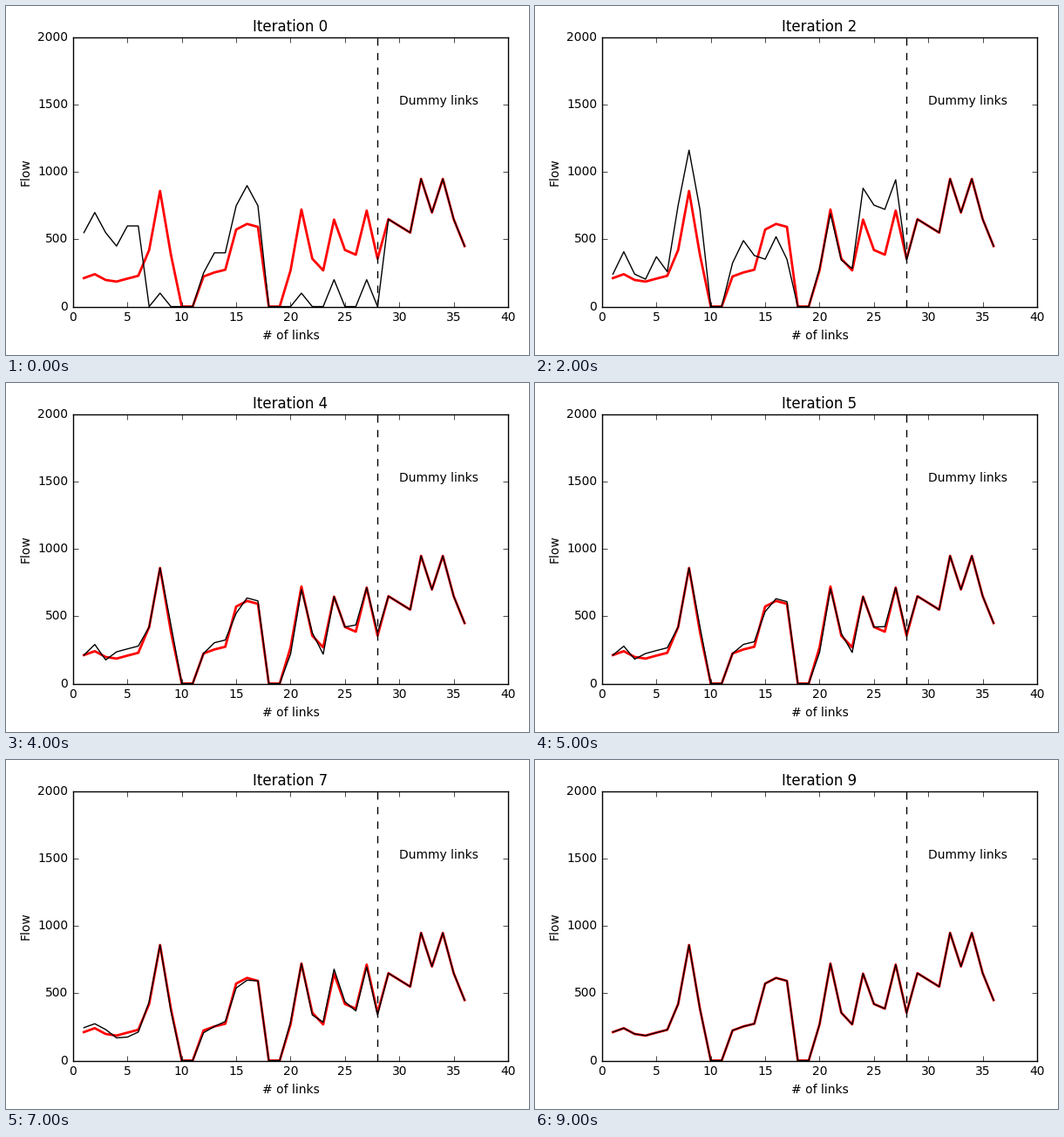
These frames come from a looping animation (600 px wide and 400 px high, 10000 ms). A matplotlib script:

```python
import numpy as np
import matplotlib.pyplot as plt
from matplotlib.animation import FuncAnimation

W, H = 600, 400
LEFT, RIGHT, TOP, BOTTOM = 76.9, 576.0, 36.35, 344.51

plt.rcParams.update({
    "font.family": "DejaVu Sans",
    "font.size": 10,
    "text.kerning_factor": 6,
    "axes.linewidth": 1.0,
    "axes.axisbelow": False,
    "ytick.alignment": "center",
    "lines.scale_dashes": False,
})

links = np.arange(1, 37)


def shift(flow, amount, up=(), down=()):
    """Move the same amount of traffic onto some links and off others."""
    return flow + amount * np.isin(links, up) - amount * np.isin(links, down)


def load(routes):
    """Sum up traffic given as {links of a route: flow}."""
    flow = np.zeros(len(links))
    for route, amount in routes.items():
        flow = shift(flow, amount, up=route)
    return flow


def blend(a, b, step):
    return (1 - step) * a + step * b


# Dummy links carry the fixed demand in every iteration.
demand = load({(29, 35): 650, (30,): 600, (31,): 550, (32, 34): 950,
               (33,): 700, (36,): 450})

# All-or-nothing loads: side streets, then main road, then side streets again.
side = demand + load({
    (1, 3): 550, (2,): 700, (4,): 450, (5, 6): 600, (12,): 250,
    (13, 14): 400, (15, 17): 750, (16,): 900})
start = shift(shift(side, 100, up=(8, 21)), 200, up=(24, 27))
main = demand + load({
    (7, 25): 1200, (8,): 1850, (9, 26): 1150, (12, 13, 14): 250,
    (20, 23): 450, (21,): 1100, (22, 28): 550, (24,): 1400, (27,): 1500})
detour = shift(side, 100, up=range(1, 7))
detour = shift(detour, 200, up=range(12, 18))
detour = shift(detour, 300, up=(2, 5, 13, 16))

# Equilibrium that the iterations settle on.
settled = demand + load({
    (1,): 212, (2,): 241, (3,): 198, (4,): 186, (5,): 208, (6,): 229,
    (7, 25): 421, (8,): 860, (9, 26): 386, (12,): 224, (13,): 254, (14,): 274,
    (15,): 573, (16,): 615, (17,): 593, (20, 23): 269, (21,): 722,
    (22, 28): 356, (24,): 647, (27,): 714})

# Ever smaller swings of traffic around the equilibrium.
swing = shift(settled, 80, up=(4, 6, 7, 9, 13, 14, 21, 22, 25, 26, 28),
              down=(20, 23))
swing = shift(swing, 45, up=(2, 5, 15, 16), down=(1, 3, 8, 17))
near = shift(settled, 50, up=(2, 4, 5, 6, 9, 13, 14, 26), down=(15, 20, 23))
near = shift(near, 22, up=(16, 17, 22, 28), down=(3, 21))
back = shift(settled, 33, up=(1, 2, 3, 24), down=(5, 15))
back = shift(back, 17, up=(7, 14, 20, 23, 25),
             down=(4, 6, 9, 12, 16, 22, 26, 27, 28))

iterations = [
    start, main, blend(main, detour, 0.371), swing,
    near, blend(near, settled, 0.25), blend(near, settled, 0.38),
    back, blend(back, settled, 0.8), settled,
]

fig = plt.figure(figsize=(W / 100, H / 100), dpi=100, facecolor="white")
ax = fig.add_axes([LEFT / W, 1 - BOTTOM / H,
                   (RIGHT - LEFT) / W, (BOTTOM - TOP) / H])
ax.set(xlim=(0, 40), ylim=(0, 2000),
       xticks=range(0, 41, 5), yticks=range(0, 2001, 500))
ax.tick_params(direction="in", length=4, width=0.5, pad=4,
               top=True, right=True)

ax.plot(links, settled, color="red", lw=2)
line, = ax.plot(links, start, color="black", lw=1)
ax.plot([28, 28], [0, 2000], color="black", lw=1, dashes=(6, 6))
ax.text(30, 1500, "Dummy links")
title = ax.set_title("Iteration 0", fontsize=12, pad=5)
ax.set_ylabel("Flow", labelpad=5)
fig.text((LEFT + RIGHT) / 2 / W, 1 - 382 / H, "# of links",
         ha="center", va="baseline")


def draw(k):
    line.set_ydata(iterations[k])
    title.set_text(f"Iteration {k}")
    return line, title


anim = FuncAnimation(fig, draw, frames=len(iterations), interval=1000,
                     repeat=True, repeat_delay=0, blit=False)
plt.show()
```
